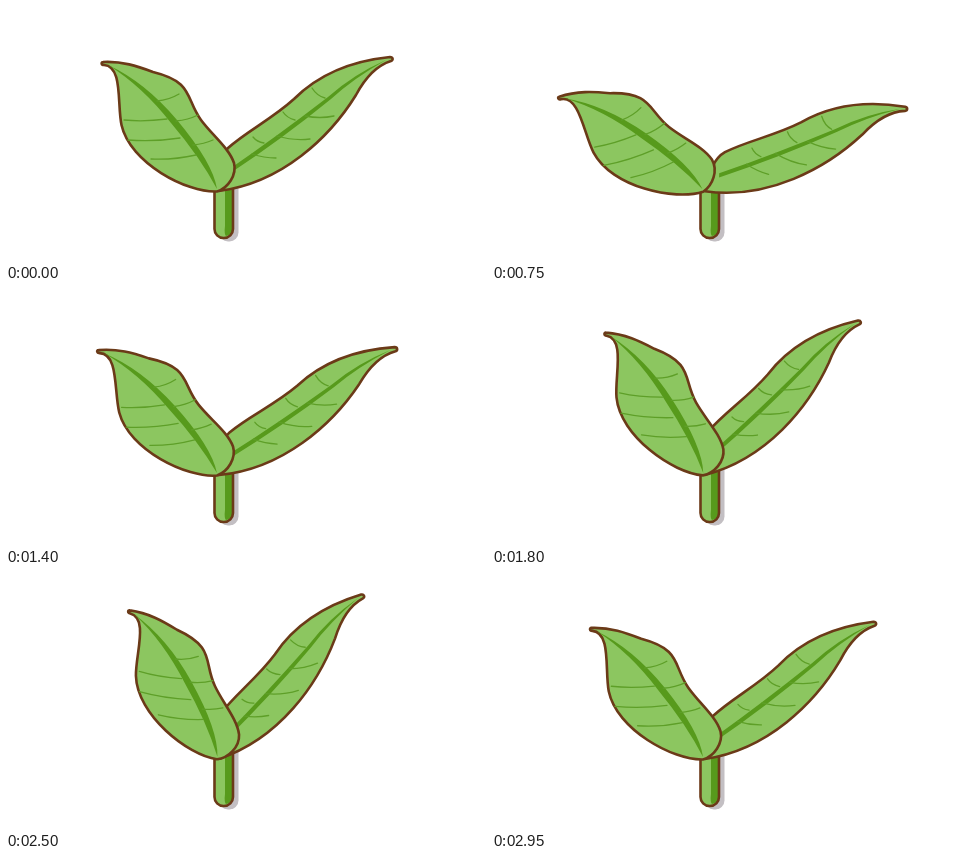
Write an HTML page that moves like this. It is 480 px wide and 256 px high and loops after 3 s.

```html
<!DOCTYPE html>
<html lang="en">
<head>
<meta charset="utf-8">
<title>Sprout</title>
<style>
html, body { margin: 0; width: 100%; height: 100%; overflow: hidden; background: #fff; }
svg { display: block; width: 100vw; height: 100vh; }
.edge { stroke: #6b3a18; stroke-width: 2.6; stroke-linejoin: round; }
.leaf { fill: #8cc660; }
.rib { fill: #579a1c; }
.veins { fill: none; stroke: #5e9f28; stroke-width: 1.3; stroke-linecap: round; }
</style>
</head>
<body>
<svg viewBox="0 0 480 256">
  <rect fill="#c3bfc3" x="213" y="160" width="19.500" height="75.500" rx="9"/>
  <rect class="leaf" x="208.500" y="160" width="18.500" height="72" rx="9"/>
  <path class="rib" d="M219 172H227V223Q226 229 220 230Q218 228 219 220Z"/>
  <rect class="edge" fill="none" x="208.500" y="160" width="18.500" height="72" rx="9"/>

  <g id="right">
    <path class="edge leaf" d="M213 185Q210 154 222 142C241 125 266 113 288 93C312 69 345 55 384 51C387 51 387.500 54 385 55C369 60 358 74 350 89C324 131 276 177 213 185Z"/>
    <path class="rib" d="M380 54Q348 68 322 91Q270 131 222 164L223 168Q276 133 325 93Q348 72 380 54Z"/>
    <path class="veins" d="M306 82Q311 90 319 92M277 106Q281 112 289 114M247 131Q251 136 258 137M299 110Q314 113 328 110M271 130Q288 135 304 133M246 148Q258 152 270 152"/>
  </g>
  <g id="left">
    <path class="edge leaf" d="M97 56C116 55 131 60 147 66C188 76 179 92 195 114C206 129 223 142 228 157C231 169 222 182 211 185.500C181 187 124 157 115.500 119C111 98 117 60 98 59C95 59 95 56 97 56Z"/>
    <path class="rib" d="M102 59Q139 76 171 114Q207 157 211 183Q194 151 165 117Q136 80 102 59Z"/>
    <path class="veins" d="M151 95Q163 94 173 88M170 115Q182 114 192 109M187 139Q198 138 207 134M118 114Q138 116 161 113M122 134Q148 136 174 132M145 153Q168 154 190 149"/>
  </g>
</svg>
<script>
const LOOP = 3000, STEP = 50, SWING = 15.2, PIVOT = '212 185';
const left = document.getElementById('left');
const right = document.getElementById('right');

// Even swing down and up, a little fuller on the raised side.
function lift(t) {
  const wave = -Math.asin(Math.sin(2 * Math.PI * t / LOOP)) * 2 / Math.PI;
  return SWING * wave + 1.2 * Math.max(0, Math.sin(Math.PI * wave)) ** 2;
}

function draw() {
  const t = Math.floor(performance.now() % LOOP / STEP) * STEP;
  const angle = lift(t);
  left.setAttribute('transform', `rotate(${angle} ${PIVOT})`);
  right.setAttribute('transform', `rotate(${-angle} ${PIVOT})`);
  requestAnimationFrame(draw);
}
draw();
</script>
</body>
</html>
```
